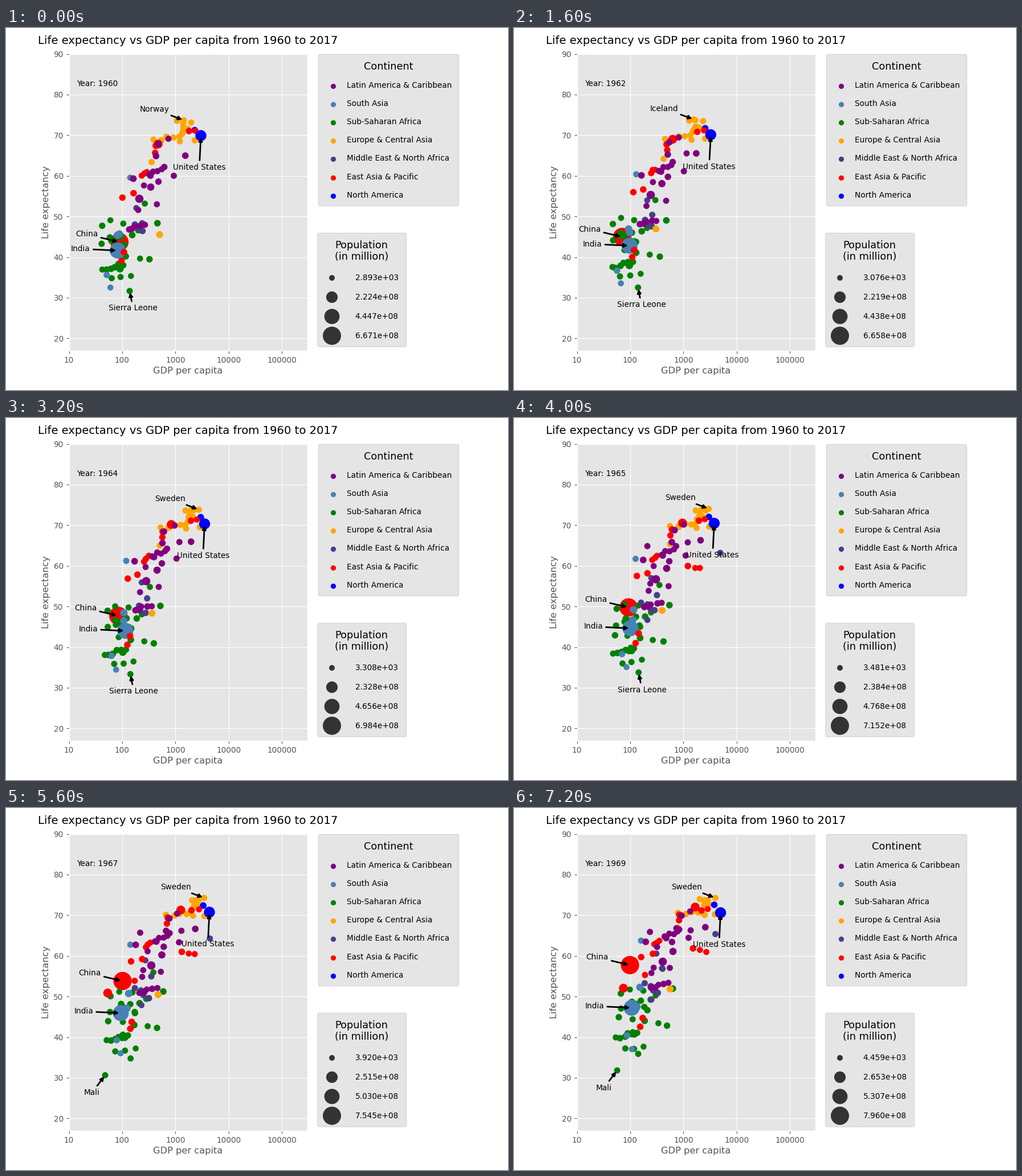
Write a matplotlib script that moves like this. It is 881 px wide and 636 px high and loops after 8000 ms.

```python
import matplotlib.pyplot as plt
import numpy as np
from matplotlib.animation import FuncAnimation
from matplotlib.patches import FancyBboxPatch

W, H, DPI = 881, 636, 100
YEARS = np.arange(10)  # counted from 1960
GREY, PANEL = "#555555", "#E5E5E5"
BASE = 9.79  # body text, points
plt.rcParams["font.size"] = BASE

CONTINENTS = {
    "Latin America & Caribbean": "purple",
    "South Asia": "steelblue",
    "Sub-Saharan Africa": "green",
    "Europe & Central Asia": "orange",
    "Middle East & North Africa": "darkslateblue",
    "East Asia & Pacific": "red",
    "North America": "blue",
}
LATIN, SOUTH, AFRICA, EUROPE, MIDEAST, EAST, NORTH = CONTINENTS.values()

rng = np.random.default_rng(7)
paths, radii, colors = [], [], []  # one entry per dot, in drawing order
named = {}


def add_dot(color, xy, radius):
    paths.append(xy)
    radii.append(radius)
    colors.append(color)


def country(name, color, knots, radius=5.5):
    """A dot that moves straight between {year: (x, y)} in stage pixels."""
    points = np.array(list(knots.values()))
    xy = np.column_stack([
        np.interp(YEARS, list(knots), axis, left=np.nan) for axis in points.T])
    named[name] = xy
    add_dot(color, xy, radius)


def cloud(color, n, start, end, drift, spread=2, since=0):
    """n dots scattered along a line, drifting with small yearly wobbles."""
    start, end, drift = map(np.array, (start, end, drift))
    progress = (YEARS - since) / (YEARS[-1] - since)
    for t in np.linspace(0, 1, n):
        home = start + t * (end - start) + rng.uniform(-spread, spread, 2)
        xy = home + np.outer(progress, drift) + rng.normal(0, 0.8, (len(YEARS), 2))
        xy[YEARS < since] = np.nan
        add_dot(color, xy, rng.uniform(5.3, 5.9))


country("China", EAST, {0: (199, 376), 2: (190, 367), 4: (197, 347.5),
                        6: (205, 318), 9: (203.5, 276)}, 16.1)

cloud(AFRICA, 3, (168, 345), (206, 342), (20, -22), 4)
cloud(AFRICA, 5, (168, 381), (234, 356), (18, -27), 4)
cloud(AFRICA, 4, (186, 371), (212, 380), (24, -28), 4)
cloud(AFRICA, 2, (245, 308), (264, 342), (15, -26), 1)
cloud(AFRICA, 4, (193, 400), (250, 410), (18, -26), 4)
cloud(AFRICA, 6, (171, 425), (205, 417), (10, -22), 3)
cloud(AFRICA, 3, (189, 440), (220, 432), (10, -16), 4)
cloud(AFRICA, 2, (177, 380), (202, 410), (6, -12), 1, since=5)

cloud(SOUTH, 2, (176, 433), (183, 456), (22, -33), 1)
country("Sri Lanka", SOUTH, {0: (218, 263), 4: (211, 251), 9: (223, 233)})
country("Bangladesh", SOUTH, {0: (199, 362), 9: (216, 349)}, 6.5)
country("Pakistan", SOUTH, {0: (195.5, 364), 9: (221, 315)}, 6.5)

cloud(MIDEAST, 3, (240, 358), (225, 342), (14, -31))
cloud(MIDEAST, 2, (238, 345), (229, 316), (22, -60))
cloud(MIDEAST, 2, (224, 325), (235, 356), (7, -17), 1, since=5)
country("Kuwait", MIDEAST, {5: (362, 237), 9: (353.5, 221.5)})

cloud(EUROPE, 5, (260, 195), (304, 196), (30, -11), 3)
cloud(EUROPE, 5, (304, 192), (314, 172), (24, -8), 3)
cloud(EUROPE, 2, (330, 198), (320, 178), (22, -10), 1)
country("Portugal", EUROPE, {0: (255.5, 235.5), 9: (288, 210)})
country("Turkey", EUROPE, {0: (269.5, 363), 2: (249, 353), 9: (274, 318)}, 6.1)
country("Netherlands", EUROPE, {0: (300, 163), 9: (334, 162)})
country("Norway", EUROPE, {0: (312, 162), 9: (340, 162)})
country("Iceland", EUROPE, {0: (311, 167), 2: (315.5, 160.5),
                            6: (344, 163), 9: (326, 160)})
country("Sweden", EUROPE, {0: (325, 166), 4: (338.5, 161),
                           6: (345, 158), 9: (353.5, 158)})

cloud(NORTH, 1, (331, 179), (331, 179), (20, -9), 0)
country("India", SOUTH, {0: (196, 391), 4: (209.5, 374),
                         6: (199, 365), 9: (206.5, 351)}, 14)

cloud(EAST, 2, (321, 182), (331, 179), (8, -2), 1)
cloud(EAST, 2, (263, 209), (263, 218), (26, -21), 1)
cloud(EAST, 3, (238, 259), (247, 252), (8, -19), 1)
cloud(EAST, 2, (204, 297), (222, 292), (21, -34), 1)
cloud(EAST, 2, (208, 393), (204, 409), (18, -26), 1)
cloud(EAST, 3, (304, 260), (328, 264), (10, -13), 3, since=5)
cloud(EAST, 1, (226, 303), (226, 303), (3, -11), 0, since=7)
country("Indonesia", EAST, {7: (178.5, 325), 9: (192, 316.5)}, 7.8)
country("Japan", EAST, {0: (267, 204), 4: (290, 187), 9: (318, 174)}, 7.8)

cloud(LATIN, 2, (268, 204), (284, 196), (24, -13), 1)
cloud(LATIN, 6, (249, 260), (279, 243), (14, -30), 3)
cloud(LATIN, 2, (263, 225), (315, 225), (22, -14), 1)
cloud(LATIN, 3, (241, 278), (295, 260), (10, -32), 1)
cloud(LATIN, 5, (213, 352), (242, 346), (26, -38), 3)
cloud(LATIN, 2, (232, 319), (265, 309), (10, -28), 1)
cloud(LATIN, 1, (223, 264), (223, 264), (6, -29), 0)
cloud(LATIN, 1, (303, 221), (303, 221), (6, -7), 0, since=2)
cloud(LATIN, 2, (233, 226), (238, 291), (6, -10), 0, since=5)
country("Mexico", LATIN, {0: (254, 279.5), 9: (279, 252)}, 6.4)
country("Brazil", LATIN, {0: (234, 300), 9: (261, 270)}, 7.3)

country("Nigeria", AFRICA, {0: (200, 423), 9: (211, 397)}, 6.6)
country("Sierra Leone", AFRICA, {0: (217, 462), 6: (219, 444), 9: (218, 432)})
country("Mali", AFRICA, {7: (174, 469.5), 9: (181, 461)})
country("United States", NORTH, {0: (342, 189), 4: (348.5, 186),
                                 7: (357, 183), 9: (362.5, 184)}, 9.7)
paths = np.array(paths)

# Best and worst life expectancy of each year, and its population range
TOP = ["Norway", "Netherlands", "Iceland"] + ["Sweden"] * 5 + ["Iceland", "Sweden"]
BOTTOM = ["Sierra Leone"] * 7 + ["Mali"] * 3
POP_MIN = [2893, 2985, 3076, 3188, 3308, 3481, 3685, 3920, 4193, 4459]
POP_MAX = [667.07, 660.33, 665.77, 682.33, 698.35,
           715.18, 735.4, 754.5, 774.51, 796.02]


def area(radius):
    """Marker size in square points for a radius in pixels."""
    return (2 * np.asarray(radius) * 72 / DPI) ** 2


fig = plt.figure(figsize=(W / DPI, H / DPI), dpi=DPI, facecolor="white")

# Chart panel
L, R, T, B = 110.5, 528.7, 45.5, 566.8
ax = fig.add_axes([L / W, 1 - B / H, (R - L) / W, (B - T) / H], facecolor=PANEL)
ax.set(xlim=(1, np.log10(300000)), ylim=(17, 90))
ax.set_xticks(range(1, 6), [str(10 ** k) for k in range(1, 6)])
ax.set_yticks(range(20, 91, 10))
ax.tick_params(colors=GREY)
ax.grid(color="white", lw=0.8)
ax.set_axisbelow(True)
for spine in ax.spines.values():
    spine.set(color="white", linewidth=1)

# Layer in stage pixels, y downwards
top = fig.add_axes([0, 0, 1, 1])
top.set(xlim=(0, W), ylim=(H, 0))
top.axis("off")


def centred(x, y, text, scale, **kw):
    top.text(x, y, text, size=scale * BASE, ha="center", **kw)


def box(x0, y0, x1, y1):
    top.add_patch(FancyBboxPatch(
        (x0, y0), x1 - x0, y1 - y0, boxstyle="round,pad=0,rounding_size=2.8",
        fc=PANEL, ec="#D6D6D6", lw=1))


centred(319, 28.5, "Life expectancy vs GDP per capita from 1960 to 2017", 1.44)
centred(319, 607, "GDP per capita", 1.2, color=GREY)
centred(70, 306, "Life expectancy", 1.2, color=GREY, rotation=90, va="center")

box(548.5, 46.5, 794.5, 312.5)
centred(671, 73, "Continent", 1.3)
for i, (name, color) in enumerate(CONTINENTS.items()):
    y = 105 + 32.1 * i
    top.scatter(574, y - 3, s=area(4.6), color=color, lw=0)
    top.text(597.5, y, name)

box(547, 360.5, 702.5, 560)
centred(624, 387, "Population", 1.3)
centred(624, 407, "(in million)", 1.3)
top.scatter([572] * 4, 439 + 33.9 * np.arange(4),
            s=area(np.sqrt(np.linspace(5 ** 2, 16 ** 2, 4))),
            color="#333333", lw=0)
pop_labels = [top.text(612.5, 443 + 33.9 * i, "") for i in range(4)]

year_label = top.text(124, 102, "")
bubbles = top.scatter(*paths[:, 0].T, s=area(radii), c=colors, lw=0)

# Offset of each label's left baseline from its dot
OFFSETS = [(-77, -15), (-49, 60), (-77, -9.5), (-82, 1), (-37, 34.5)]
notes = [
    top.annotate("", (0, 0), (0, 0), zorder=5,
                 arrowprops=dict(arrowstyle="-|>", color="black", lw=2))
    for _ in OFFSETS
]


def update(i):
    bubbles.set_offsets(paths[:, i])
    year_label.set_text(f"Year: {1960 + i}")
    for label, pop in zip(pop_labels, np.linspace(POP_MIN[i], POP_MAX[i] * 1e6, 4)):
        label.set_text(f"{pop:.3e}")
    names = [TOP[i], "United States", "China", "India", BOTTOM[i]]
    for note, name, offset in zip(notes, names, OFFSETS):
        note.set_text(name)
        note.xy = tuple(named[name][i])
        note.xyann = tuple(named[name][i] + offset)
    return [bubbles, year_label, *pop_labels, *notes]


anim = FuncAnimation(fig, update, frames=len(YEARS), interval=800, repeat=True)
plt.show()
```
